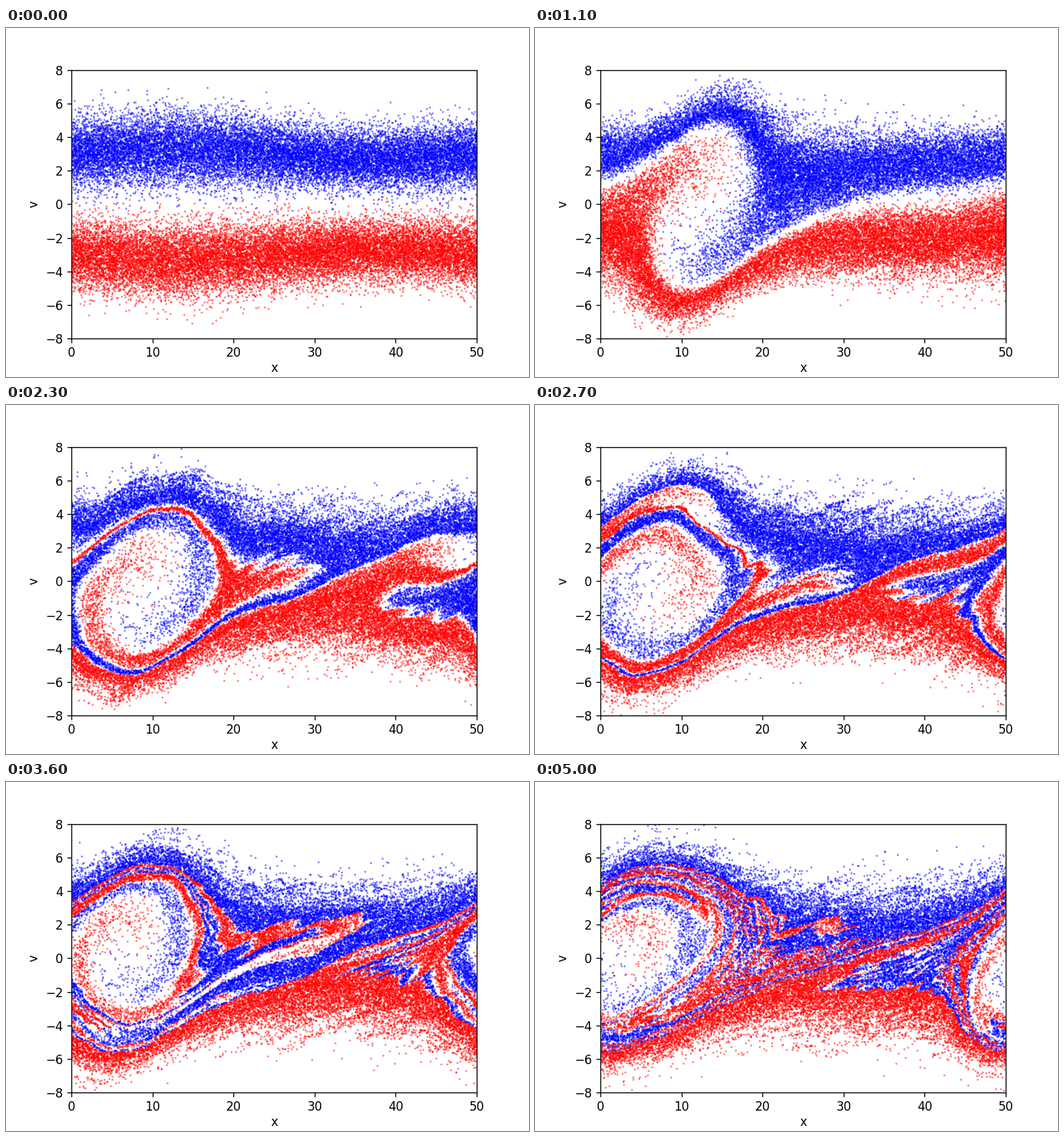
These frames come from a looping animation (720x480 px, 5100 ms). A matplotlib script:

```python
import numpy as np
import matplotlib.pyplot as plt
from matplotlib.animation import FuncAnimation

# Two-stream instability: a 1D particle-in-cell plasma in phase space
N = 40000
CELLS = 400
BOX = 50.0
DX = BOX / CELLS
DT = 1.0
FRAMES = 51
BEAM, THERMAL, AMP = 3, 1, 0.1
HALF = N // 2


def initial_state():
    rng = np.random.RandomState(42)
    pos = rng.rand(N) * BOX
    vel = THERMAL * rng.randn(N) + BEAM
    vel[HALF:] *= -1
    vel *= 1 + AMP * np.sin(2 * np.pi * pos / BOX)
    return pos, vel


def acceleration(pos):
    """Deposit charge on the grid, solve for the field, interpolate back."""
    cell = np.floor(pos / DX).astype(int)
    right = pos / DX - cell
    left = 1 - right
    cell %= CELLS
    nxt = (cell + 1) % CELLS
    density = np.bincount(cell, weights=left, minlength=CELLS)
    density += np.bincount(nxt, weights=right, minlength=CELLS)
    density *= BOX / N / DX
    slope = np.cumsum(density - 1) * DX
    slope -= slope.mean()
    push = (slope + np.roll(slope, 1)) / 2
    return left * push[cell] + right * push[nxt]


def simulate():
    """Semi-implicit Euler: a full kick, then a full drift."""
    pos, vel = initial_state()
    states = [(pos, vel)]
    for _ in range(FRAMES - 1):
        vel = vel + acceleration(pos) * DT
        pos = np.mod(pos + vel * DT, BOX)
        states.append((pos, vel))
    return states


states = simulate()

fig, ax = plt.subplots(figsize=(6, 4), dpi=120)
ax.set(xlim=(0, BOX), ylim=(-8, 8))
ax.set_xlabel("x", labelpad=2)
ax.set_ylabel("v")
ax.set_xticks(range(0, 51, 10))
ax.set_yticks(range(-8, 9, 2))
ax.tick_params(axis="x", pad=3)

dots = dict(linestyle="none", marker=".", markersize=1, alpha=0.6)
blue, = ax.plot([], [], color="blue", **dots)
red, = ax.plot([], [], color="red", **dots)


def draw(i):
    pos, vel = states[i]
    blue.set_data(pos[:HALF], vel[:HALF])
    red.set_data(pos[HALF:], vel[HALF:])
    return blue, red


anim = FuncAnimation(fig, draw, frames=FRAMES, interval=100,
                     init_func=lambda: draw(0), repeat=True)
plt.show()
```
